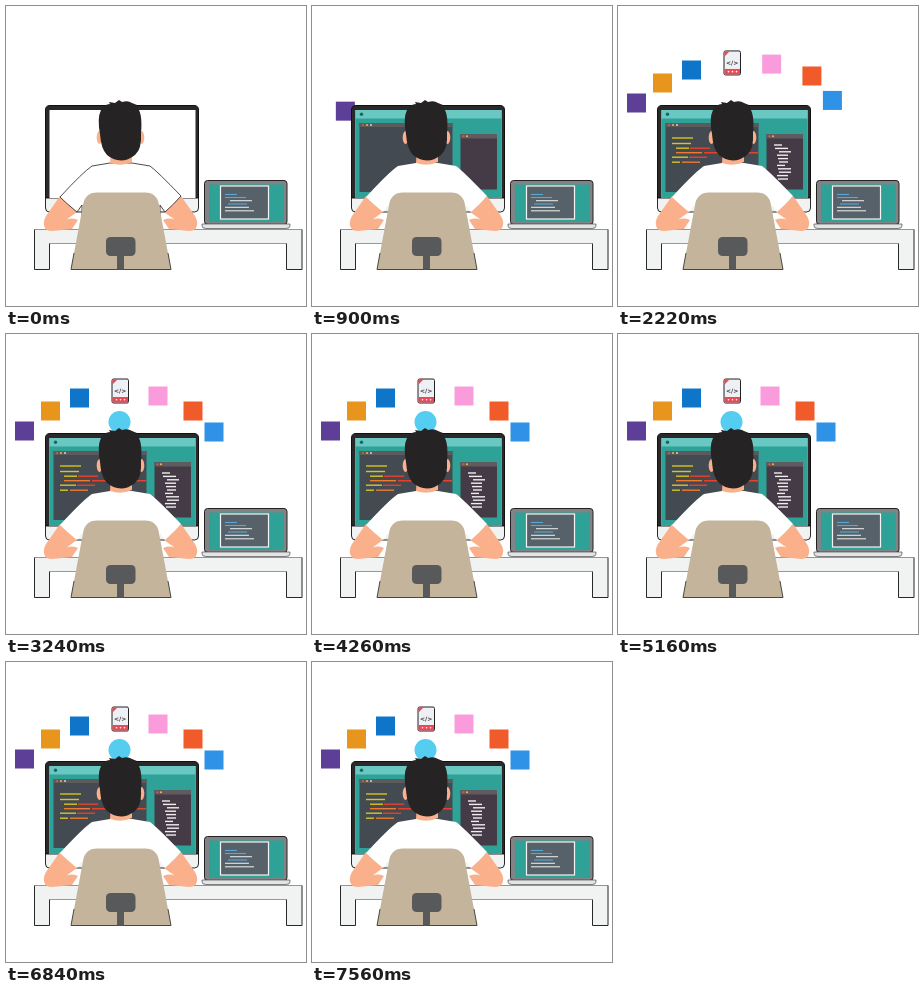
Animation, 300 px wide and 300 px high, one loop 7.62 s. Source, as an HTML page:

```html
<!DOCTYPE html>
<html lang="en">
<head>
<meta charset="utf-8">
<title>Developer at a desk</title>
<style>
  html, body { margin: 0; width: 100%; height: 100%; overflow: hidden; background: #fff; }
  svg { display: block; width: 100vw; height: 100vh; }
  text { font-family: "DejaVu Sans", Arial, sans-serif; font-weight: bold; }
</style>
</head>
<body>
<svg viewBox="0 0 300 300">
  <g id="icons"></g>

  <!-- monitor -->
  <path d="M39.500 192V104Q39.500 99.500 44 99.500H188Q192.500 99.500 192.500 104V192Z" fill="#2b2829" stroke="#111"/>
  <path d="M39.500 192H192.500V202Q192.500 206 188.500 206H43.500Q39.500 206 39.500 202Z" fill="#f1f2f2" stroke="#111" stroke-width=".9"/>
  <rect x="43.500" y="104" width="146" height="88" fill="#fff"/>
  <g id="screen">
    <rect x="43.500" y="104" width="146" height="88" fill="#2fa297"/>
    <rect x="43.500" y="104" width="146" height="8.500" fill="#69c8c2"/>
    <circle cx="49.500" cy="108.300" r="1.700" fill="#17685f"/>
  </g>
  <g id="leftWindow">
    <rect x="47.500" y="117" width="93" height="69" fill="#434a51"/>
    <rect x="47.500" y="117" width="93" height="4" fill="#5c5a5d"/>
    <circle cx="51" cy="119" r="1" fill="#e9573f"/>
    <circle cx="55" cy="119" r="1" fill="#f5b942"/>
    <circle cx="59" cy="119" r="1" fill="#d8d5c0"/>
  </g>
  <g id="rightWindow">
    <rect x="148.500" y="128" width="36.500" height="55.500" fill="#443b46"/>
    <rect x="148.500" y="128" width="36.500" height="4.500" fill="#5f5b60"/>
    <circle cx="151.500" cy="130.200" r="1" fill="#e9573f"/>
    <circle cx="155" cy="130.200" r="1" fill="#f5b942"/>
  </g>
  <g id="code" fill="none" stroke-width="1.400"></g>

  <!-- desk -->
  <path d="M28 223H296.500V264H280V237.500H44V264H28Z" fill="#f1f2f2"/>
  <path d="M28.500 223.500V263.500H43.500V237.500M280.500 237.500V263.500H296V223.500" fill="none" stroke="#111" stroke-width=".9"/>
  <path d="M28.500 223.500H296M43.500 237.500H280.500" stroke="#55585b" stroke-width=".6"/>

  <!-- laptop -->
  <rect x="198.500" y="174.500" width="82.500" height="44" rx="3" fill="#808487" stroke="#222"/>
  <rect x="203" y="178.500" width="75" height="37.500" fill="#2fa297"/>
  <rect x="214.500" y="180" width="48" height="33" fill="#56616a" stroke="#f4f4f4" stroke-width="1.200"/>
  <g id="laptopCode" fill="none" stroke-width="1.100"></g>
  <path d="M196 218H284V220Q284 222.500 280 222.500H200Q196 222.500 196 220Z" fill="#e2e4e5" stroke="#333" stroke-width=".6"/>

  <!-- person -->
  <g id="arms" fill="#fbb08c">
    <path id="arm" d="M54 190L40 210Q36.500 216 38.500 221Q40 225 46 225L66 223L72 214Q66 211.500 60.500 213.500L71 206Z"/>
    <use href="#arm" transform="translate(229) scale(-1 1)"/>
  </g>
  <path id="shirt" d="M86 160L104 157H126L144 160Q151 165 175 190Q168 198 159 206L154 199V224H76V199L71 206Q61 198 54 191Q77 166 86 160Z" fill="#fff" stroke="#231f20" stroke-width=".8"/>
  <g fill="#fbb08c">
    <path d="M105 142H126V156Q115.500 161 104 157Z"/>
    <ellipse cx="93.500" cy="131.500" rx="2.800" ry="6.500"/>
    <ellipse cx="135.500" cy="131.500" rx="2.800" ry="6.500"/>
  </g>
  <path d="M94 128Q91 112 95 104Q98 98 104 98L103 96L109 97L113 94L116 96Q122 94 126 97L131 99L130 100Q137 106 135 127Q136 143 129 149Q122 154.500 115 154.500Q107 154 101 149Q95 143 94 128Z" fill="#262324"/>

  <!-- chair -->
  <path d="M65 263.500L77 199Q79 186.500 91 186.500H139Q151 186.500 153 199L165 263.500Z" fill="#c3b49b"/>
  <path d="M68 247L65 263.500H165L162 247" fill="none" stroke="#222" stroke-width=".8"/>
  <rect x="100" y="231" width="29.500" height="19" rx="4.500" fill="#58595b"/>
  <rect x="111" y="247" width="7" height="16.500" fill="#58595b"/>
</svg>

<script>
const LOOP = 7620, STEP = 60;
const FLIGHT = 1065, STAGGER = 186, FIRST_ICON = 618;
const ORIGIN = { x: 115, y: 150 };
const NS = "http://www.w3.org/2000/svg";
const byId = id => document.getElementById(id);
const clamp = v => Math.max(0, Math.min(1, v));
const progress = (t, start, length) => clamp((t - start) / length);
const easeOut = p => 1 - (1 - p) ** 3;
const backOut = p => 1 + 2.70158 * (p - 1) ** 3 + 1.70158 * (p - 1) ** 2;

function add(parent, tag, attrs, content = "") {
  const el = document.createElementNS(NS, tag);
  for (const key in attrs) el.setAttribute(key, attrs[key]);
  el.textContent = content;
  parent.append(el);
  return el;
}

const square = color => g =>
  add(g, "rect", { x: -9.5, y: -9.5, width: 19, height: 19, fill: color });

const disc = color => g => add(g, "circle", { r: 11, fill: color });

function codeFile(g) {
  add(g, "rect", { x: -8.5, y: -12, width: 16.5, height: 24, rx: 1.5, fill: "#edf0f4", stroke: "#222", "stroke-width": 1 });
  add(g, "path", { d: "M-8 -6.5V-11.5H-3Z", fill: "#e64b57" });
  add(g, "text", { x: -0.3, y: 2, "font-size": 6, "text-anchor": "middle", fill: "#3a3335" }, "</>");
  add(g, "rect", { x: -8, y: 6, width: 15.5, height: 5.5, fill: "#e64b57" });
  for (const x of [-4, 0, 4]) add(g, "circle", { cx: x, cy: 8.7, r: 0.8, fill: "#fff" });
}

const icons = [
  [18.5, 97, square("#5e3f97")],
  [44.5, 77, square("#e8951e")],
  [73.5, 64, square("#0f75c8")],
  [114.5, 57, codeFile],
  [152, 62, square("#fa9bdc")],
  [187, 77, square("#f15a29")],
  [208, 98, square("#2f92e6")],
  [113.5, 88, disc("#55cdf0"), 2100]
].map(([x, y, draw, start], i) => {
  const el = add(byId("icons"), "g", {});
  draw(el);
  return { x, y, el, start: start ?? FIRST_ICON + i * STAGGER };
});

const YELLOW = "#d9c51e", ORANGE = "#ee7a2f", RED = "#e8402a", PALE = "#e4e6e6", BLUE = "#58a9d6";

// Each line: x, y, length, colour
const leftLines = [
  [54, 132, 21, YELLOW], [54, 137.5, 19, YELLOW], [58, 142.2, 13, YELLOW], [72, 142.2, 20, RED],
  [58, 146.7, 26, ORANGE], [86, 146.7, 54, RED], [54, 151.2, 16, YELLOW], [71, 151.2, 18, RED],
  [54, 156.2, 8, YELLOW], [64, 156.2, 18, ORANGE]
];
const rightLines = Array.from({ length: 11 }, (_, i) =>
  [156 + (i > 1 ? 3 : 0) + (i % 3), 139 + i * 3.4, 8 + (i * 5) % 6, "#f0edef"]);
const laptopLines = [
  [219, 188.5, 12, BLUE], [219, 191.5, 21, BLUE], [224, 194.7, 22, PALE],
  [222, 198, 19, BLUE], [219, 201.3, 24, PALE], [219, 204.8, 29, PALE]
];

function setLine(el, [x, y, length], p) {
  el.setAttribute("d", p > 0 ? `M${x} ${y}h${length * p}` : "");
}

function typed(lines, start, end) {
  const share = (end - start) / lines.length;
  return lines.map((line, i) => ({
    line, start: start + i * share, share,
    el: add(byId("code"), "path", { stroke: line[3] })
  }));
}

const typing = [...typed(leftLines, 1000, 2150), ...typed(rightLines, 1100, 2180)];
for (const line of laptopLines)
  setLine(add(byId("laptopCode"), "path", { stroke: line[3] }), line, 1);

function popWindow(id, x, y, p) {
  byId(id).setAttribute("transform", `translate(${x} ${y}) scale(${easeOut(p)}) translate(${-x} ${-y})`);
}

function render(t) {
  const lit = progress(t, 60, 360);
  byId("screen").setAttribute("opacity", lit);
  byId("shirt").setAttribute("stroke-opacity", 1 - lit);
  popWindow("leftWindow", 94, 151, progress(t, 360, 360));
  popWindow("rightWindow", 167, 156, progress(t, 480, 360));

  for (const { el, line, start, share } of typing) setLine(el, line, progress(t, start, share));

  for (const { x, y, el, start } of icons) {
    const k = backOut(progress(t, start, FLIGHT));
    el.setAttribute("visibility", t > start ? "visible" : "hidden");
    el.setAttribute("transform",
      `translate(${ORIGIN.x + (x - ORIGIN.x) * k} ${ORIGIN.y + (y - ORIGIN.y) * k})`);
  }
}

const began = performance.now();
function tick() {
  const t = (performance.now() - began) % LOOP;
  render(t < 2 * STEP ? 0 : Math.floor(t / STEP) * STEP);
  requestAnimationFrame(tick);
}
tick();
</script>
</body>
</html>
```
